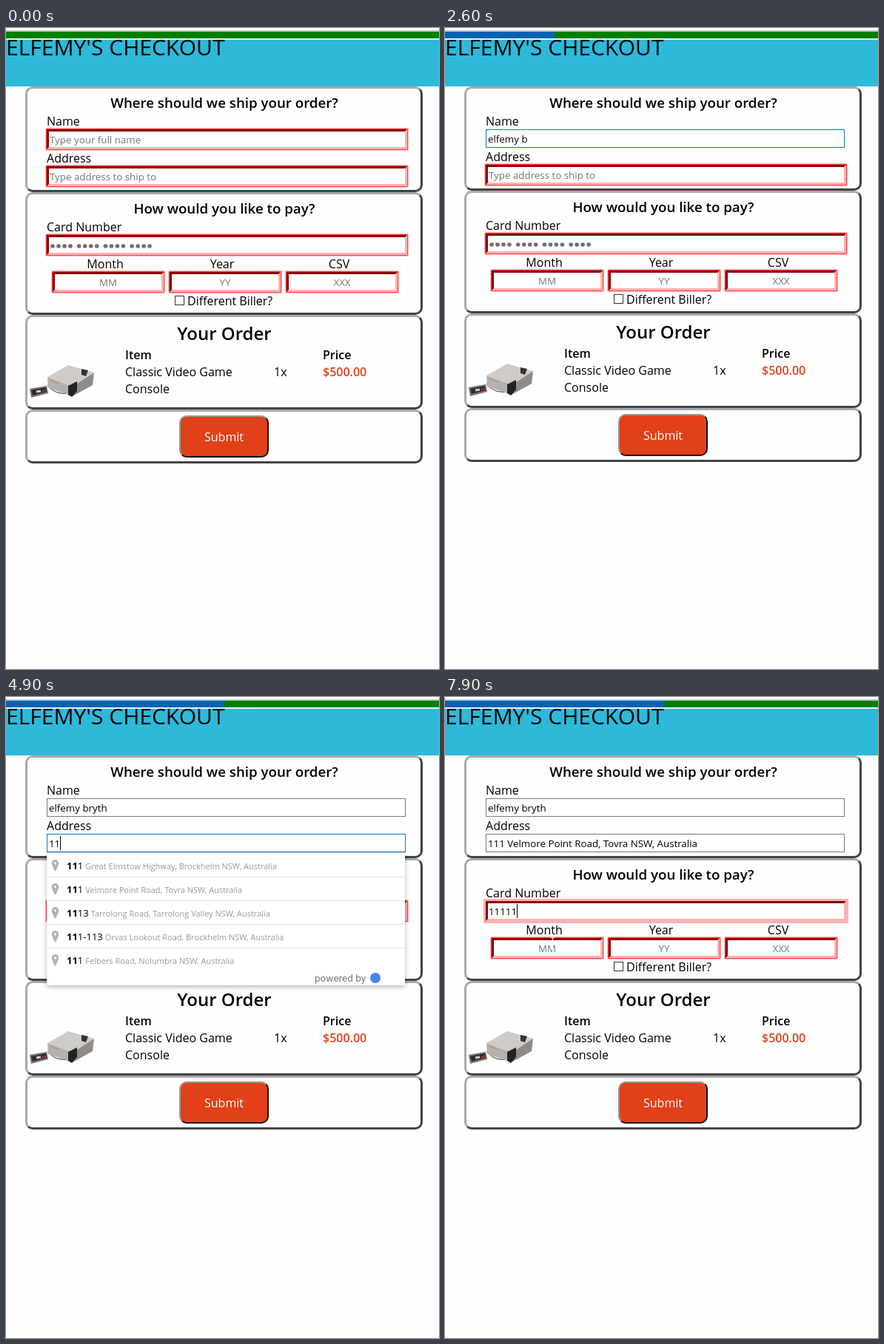
An HTML page that plays this animation: 585 by 867 pixels, repeating every 8 s.

```html
<!DOCTYPE html>
<html lang="en">
<head>
<meta charset="utf-8">
<title>Checkout</title>
<style>
html, body { margin: 0; width: 100%; height: 100%; overflow: hidden; background: #fefefe; }
body { position: relative; font: 16px "Open Sans", sans-serif; color: #000; }
body * { box-sizing: border-box; }
section { position: relative; width: 585px; }
section > *, .group > *, .abs, .caret { position: absolute; }
.card { left: 26px; width: 537px; top: 0; bottom: 0; border: 3px solid; border-radius: 10px;
  border-color: #a9a9a9 #434343 #434343 #a9a9a9; background: #fefefe; }
/* zero line height: top is the middle of the line */
.text { line-height: 0; white-space: pre; }
.mid { width: 0; display: flex; justify-content: center; }
.h2 { font-size: 24px; font-weight: 600; }
.h3 { font-size: 18.72px; font-weight: 600; }
.semi { font-weight: 600; }
.price { color: #e14018; }
.small { font-size: 13.33px; }
.hint { color: #757575; }
.progress { top: 3px; width: 100%; height: 13px; background: green; border: solid; border-width: 2px 0;
  border-color: #c4c4c4 #e8e8e8 #e8f4f0; }
.field { height: 27px; border: 3px solid; border-color: #8b0000 #ffb0b0 #ffb0b0 #8b0000; background: #fff;
  box-shadow: 0 0 1.5px 1px red; }
.field.focus { box-shadow: 0 0 0 3px #ffb0b0; }
.field.ok { height: 25px; border: 1px solid #7a7a7a; box-shadow: none; }
.field.ok.focus { border-color: #0078d7; }
.field.ok.hover { border-color: #171717; }
.caret { width: 1px; height: 19px; margin-top: -10px; background: #000; }
.submit { width: 121px; height: 57px; border: 2px solid; border-radius: 10px;
  border-color: #999 #111 #111 #999; background: #e14018; }
.check { width: 13px; height: 13px; border: 1px solid #333; background: #fff; }
#list { width: 484px; height: 180px; background: #fff; border-top: 1px solid #d9d9d9;
  box-shadow: 0 2px 6px rgba(0,0,0,.3); }
.row { width: 100%; height: 32px; border-bottom: 1px solid #e6e6e6; }
.row:nth-child(5) { border: 0; }
.row .text { font-size: 11px; color: #999; }
.row span { font-size: 13px; color: #000; margin-right: 3px; }
.row svg { left: 6px; top: 8px; }
</style>
</head>
<body>
<div class="abs" style="top:15px;width:100%;height:64px;background:#2eb9d9"></div>
<div class="abs progress"><div class="abs" id="bar" style="height:100%;background:#0662b5"></div></div>
<div class="abs text" style="top:25.5px;font-size:30px">ELFEMY'S CHECKOUT</div>
<div style="height:79px"></div>
<script>
const LOOP = 8000, NAME = 'elfemy bryth', ADDRESS = '111 Velmore Point Road, Tovra NSW, Australia';

function put(parent, cls, x, y, html = '', css = '') {
  const el = document.createElement('div');
  el.className = cls;
  el.style.cssText = `left:${x}px;top:${y}px;${css}`;
  el.innerHTML = html;
  return parent.appendChild(el);
}

function section(height) {
  const el = document.body.appendChild(document.createElement('section'));
  el.style.height = height + 'px';
  el.innerHTML = '<div class="card"></div>';
  return el;
}

function field(parent, x, y, width, hint, centred) {
  const box = put(parent, 'field', x, y, '', `width:${width}px`);
  const place = centred
    ? put(parent, 'text small hint mid', x + width / 2, y + 14, hint)
    : put(parent, 'text small hint', x + 4, y + 14, hint);
  const value = put(parent, 'text small', x + 4, y + 14);
  return {
    show(text, { ok, focus, hover, caret }) {
      box.className = `field${ok ? ' ok' : ''}${focus ? ' focus' : ''}${hover ? ' hover' : ''}`;
      box.style.width = width - (ok ? 2 : 0) + 'px';
      place.style.display = text ? 'none' : '';
      value.innerHTML = text + (focus && caret ? '<i class="caret"></i>' : '');
      value.style.left = x + (ok ? 3 : 4) + 'px';
      value.style.top = y + (ok ? 13 : 14) + 'px';
    }
  };
}

// Shipping; the address part moves up once the name is valid
const ship = section(143);
put(ship, 'text h3 mid', 295, 22, 'Where should we ship your order?');
put(ship, 'text', 55, 47, 'Name');
const nameField = field(ship, 55, 58, 487, 'Type your full name');
const lower = put(ship, 'group', 0, 0);
put(lower, 'text', 55, 97, 'Address');
const addressField = field(lower, 55, 108, 487, 'Type address to ship to');

// Payment
const pay = section(166);
put(pay, 'text h3 mid', 295, 22, 'How would you like to pay?');
put(pay, 'text', 55, 47, 'Card Number');
let dots = '';
for (let i = 0; i < 16; i++) {
  const group = i >> 2;
  dots += `<circle cx="${4 + group * 35.7 + i % 4 * 8}" cy="0" r="2.8" fill="${group < 2 ? '#7b6b66' : '#66707f'}"/>`;
}
const cardField = field(pay, 55, 58, 487,
  `<svg class="abs" width="150" height="10" viewBox="0 -5 150 10" style="top:-4px">${dots}</svg>`);
[['Month', 'MM'], ['Year', 'YY'], ['CSV', 'XXX']].forEach(([label, hint], i) => {
  put(pay, 'text mid', 134 + 158 * i, 97, label);
  field(pay, 63 + 158 * i, 108, 150, hint, true);
});
put(pay, 'check', 228, 140);
put(pay, 'text', 245, 147, 'Different Biller?');

// Order
const order = section(128);
put(order, 'text h2 mid', 295, 25, 'Your Order');
put(order, 'text semi', 161, 54, 'Item');
put(order, 'text semi', 428, 54, 'Price');
put(order, 'text', 161, 77, 'Classic Video Game');
put(order, 'text', 161, 100, 'Console');
put(order, 'text', 362, 77, '1x');
put(order, 'text semi price', 428, 77, '$500.00');
put(order, '', 30, 64, `<svg class="abs" width="92" height="52">
  <path d="M26 31Q34 41 44 42T60 43" fill="none" stroke="#333"/>
  <path d="M26 20L54 4 89 14 60 33Z" fill="#cfccc8"/>
  <path d="M26 20L60 33V46L27 35Z" fill="#b5b1ac"/>
  <path d="M60 33L89 14 87 31 60 46Z" fill="#8f8b87"/>
  <path d="M54 32L66 26V39L59 47 54 44Z" fill="#222"/>
  <path d="M72 9L81 11 78 19 72 17Z" fill="#333"/>
  <path d="M29 24L42 29" stroke="#b98478"/>
  <path d="M2 36L25 32 27 42 4 48Z" fill="#77736f"/>
  <path d="M4 38L24 34 25 40 6 45Z" fill="#2b2b2b"/>
  <path d="M11 40L17 39" stroke="#ccc" stroke-width="3"/>
  <circle cx="20" cy="39" r="1.3" fill="#c33"/><circle cx="23" cy="38" r="1.3" fill="#c33"/></svg>`);

const send = section(73);
put(send, 'submit', 234, 8);
put(send, 'text mid', 294.5, 37, 'Submit', 'color:#fff');

// Address suggestions
const list = put(document.body, 'abs', 55, 210);
list.id = 'list';
const rows = [
  ['', 'Great Elmstow Highway, Brockhelm NSW, Australia'],
  ['', 'Velmore Point Road, Tovra NSW, Australia'],
  ['3', 'Tarrolong Road, Tarrolong Valley NSW, Australia'],
  ['-113', 'Orvas Lookout Road, Brockhelm NSW, Australia'],
  ['', 'Felbers Road, Nolumbra NSW, Australia']
].map(([rest, place], i) => {
  const row = put(list, 'abs row', 0, 1 + 32 * i, `<svg class="abs" width="11" height="17">
    <path d="M5.5 0A4.7 4.7 0 0 0 .8 4.7C.8 8.5 5.5 16 5.5 16S10.2 8.5 10.2 4.7A4.7 4.7 0 0 0 5.5 0Z" fill="#b3b3b3"/>
    <circle cx="5.5" cy="4.8" r="1.6" fill="#fff"/></svg>`);
  const text = put(row, 'abs text', 27, 16);
  return query => {
    text.innerHTML = `<span><b>${query}</b>${'111'.slice(query.length)}${rest}</span>${place}`;
  };
});
put(list, 'abs text', 362, 169, 'powered by', 'font:13.5px/0 Roboto,sans-serif;color:#777');
put(list, 'abs', 437, 162, '', 'width:14px;height:14px;border-radius:50%;background:#4285f4');

// Mouse
const arrow = put(document.body, 'abs', 0, 0, `<svg width="13" height="22">
  <path d="M.5 .5V17L4.3 13.4 7 20 9.6 19 6.9 12.5H12Z" fill="#fff" stroke="#000"/></svg>`);
const beam = put(document.body, 'abs', 0, 0, `<svg width="7" height="17">
  <path d="M1 .5H6M3.5 0V17M1 16.5H6" stroke="#fff" fill="none"/></svg>`);

const NAME_KEYS = [1600, 1700, 1800, 2000, 2100, 2300, 2400, 2600, 2800, 3000, 3100, 3300];
const ADDRESS_KEYS = [4500, 4700, 5200];
const CARD_KEYS = [7300, 7800, 7800, 7900, 7900];
const CARET_ON = [[600, 1100], [1600, 2600], [2800, 3300], [3500, 4000], [4500, 5800],
  [6400, 6900], [7300, 7500], [7800, LOOP]];

const typed = (text, keys, t) => text.slice(0, keys.filter(k => k <= t).length);
const within = (t, a, b) => t >= a && t < b;

function place(el, on, x, y) {
  el.style.display = on ? '' : 'none';
  el.style.transform = `translate(${Math.round(x)}px,${Math.round(y)}px)`;
}

function draw(t) {
  const nameOk = t >= 1600, addressOk = t >= 4500;
  const valid = nameOk + addressOk;
  const caret = CARET_ON.some(([a, b]) => within(t, a, b));
  const query = typed('111', ADDRESS_KEYS, t);

  bar.style.width = [0, 148, 295][valid] + 'px';
  ship.style.height = 143 - 2 * valid + 'px';
  lower.style.top = nameOk ? '-2px' : 0;

  nameField.show(typed(NAME, NAME_KEYS, t),
    { ok: nameOk, focus: within(t, 600, 3500), hover: within(t, 3500, 4900), caret });
  addressField.show(t < 5800 ? query : ADDRESS,
    { ok: addressOk, focus: within(t, 3500, 5800), caret });
  cardField.show(typed('11111', CARD_KEYS, t), { focus: t >= 6400, caret });

  list.style.display = within(t, 4900, 5800) ? '' : 'none';
  rows.forEach(row => row(query));

  const k = Math.min(1, Math.max(0, (t - 5300) / 300)), go = t >= 6100;
  place(arrow, within(t, 5300, 6200), go ? 182 : 240 - 35 * k, go ? 276 : 215 + 50 * k);
  if (t < 7900) place(beam, t >= 6200, 156, 288);
  else place(beam, true, 142, 325);
}

function tick() {
  draw(performance.now() % LOOP);
  requestAnimationFrame(tick);
}
tick();
</script>
</body>
</html>
```
